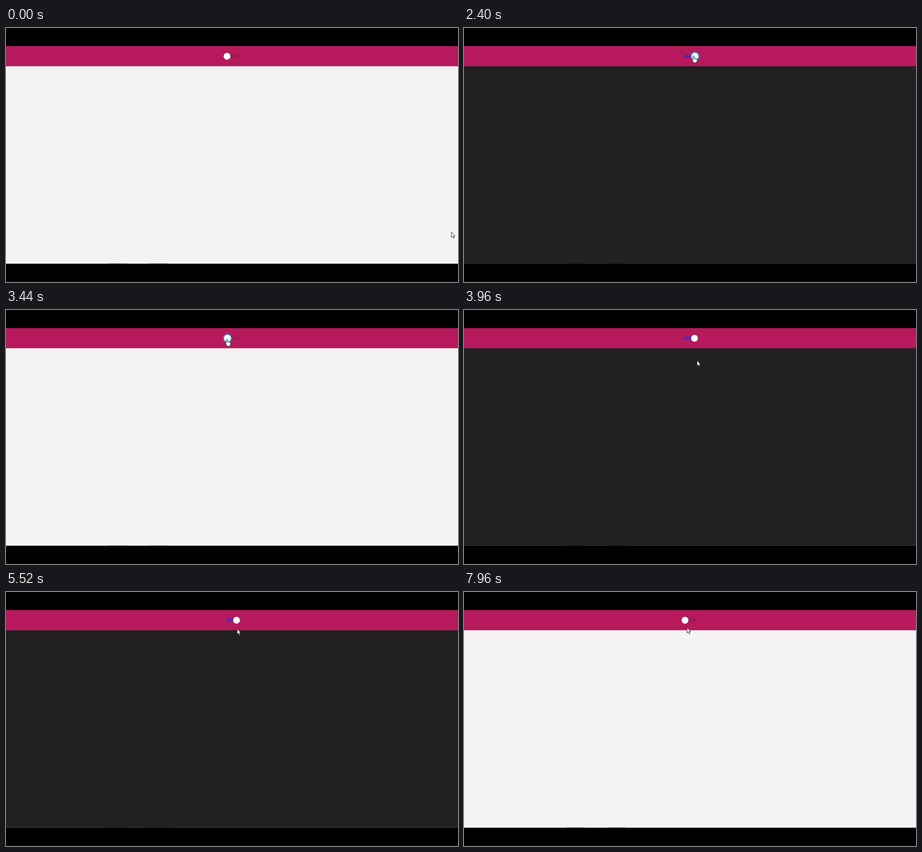
Animation of 998x561 px, one loop 8 s. Source, as an HTML page with a canvas:

```html
<!DOCTYPE html>
<html lang="en">
<head>
<meta charset="utf-8">
<title>Theme toggle</title>
<style>
html, body { margin: 0; width: 100%; height: 100%; overflow: hidden; background: #000; }
canvas { display: block; width: 100%; height: 100%; }
</style>
</head>
<body>
<canvas id="stage" width="998" height="561"></canvas>
<script>
const ctx = document.getElementById('stage').getContext('2d');
const LOOP = 8000, STEP = 40, SLIDE = 400, BLANK = 160;
const TOP = 40, HEADER_END = 84.5, BOTTOM = 520;

// Each click flips the switch; each reload blanks the page for a moment.
const clicks = [1320, 2440, 3520, 5800];
const reloads = [4600, 6480];

const home = { x: 983, y: 450 };
const offKnob = { x: 491, y: 57 };
const onKnob = { x: 507, y: 61 };
const moves = [
  { from: 40, to: 800, spot: offKnob },
  { from: 1360, to: 2080, spot: onKnob },
  { from: 2520, to: 3080, spot: { x: 488, y: 64 } },
  { from: 3520, to: 3800, spot: onKnob },
  { from: 3840, to: 4120, spot: { x: 526, y: 188 } },
  { from: 5160, to: 5640, spot: onKnob },
  { from: 5920, to: 6360, spot: { x: 561, y: 213 } },
  { from: 6920, to: 7520, spot: { x: 498, y: 100 } },
  { from: 7800, to: 7960, spot: { x: 492, y: 78 } }
];

const arrow = new Path2D('M.5 .5V12.6L3.2 10L5.2 14.4L7 13.6L5 9.3H8.6Z');
const hand = new Path2D('M-1.3 1.2Q0 -.8 1.3 1.2V5.5Q2.6 4.4 3.6 6Q5 5 6 6.8' +
  'Q7.8 6 7.9 8V11.5L6.5 14V16H-.3V14L-3.8 9.6Q-4 7.6 -2.5 8.2L-1.3 9.4Z');
const knuckles = new Path2D('M1.3 5.5V8.5M3.6 6V8.7M6 6.8V9');

const clamp = v => Math.max(0, Math.min(1, v));
const mix = (a, b, k) => a + (b - a) * k;
const ease = v => { const k = clamp(v); return k * k * (3 - 2 * k); };
const blend = (a, b, k) => `rgb(${a.map((v, i) => Math.round(mix(v, b[i], k)))})`;

function rect(color, x, y, right, bottom) {
  ctx.fillStyle = color;
  ctx.fillRect(x, y, right - x, bottom - y);
}

function disc(color, x, y, r) {
  ctx.fillStyle = color;
  ctx.beginPath();
  ctx.arc(x, y, r, 0, 2 * Math.PI);
  ctx.fill();
}

function pointerAt(t) {
  const place = moves.reduce((p, { from, to, spot }) => {
    const k = ease((t - from) / (to - from));
    return { x: mix(p.x, spot.x, k), y: mix(p.y, spot.y, k) };
  }, home);
  return { x: Math.round(place.x), y: Math.round(place.y) };
}

function drawSwitch(t, count) {
  const slide = count ? ease((t - clicks[count - 1]) / SLIDE) : 1;
  const on = count % 2 ? slide : 1 - slide;
  const glow = clamp((t - 640) / 120) * clamp((3680 - t) / 120);
  const x = mix(488, 509, on) + glow, y = 62.4;

  ctx.fillStyle = blend([163, 24, 86], [91, 43, 160], on);
  ctx.beginPath();
  ctx.roundRect(485, 58.5, 29, 7.5, 3);
  ctx.fill();

  if (glow) {
    const halo = ctx.createRadialGradient(x, y, 7, x, y, 10.8);
    halo.addColorStop(0, `rgba(45,165,220,${glow})`);
    halo.addColorStop(0.5, `rgba(45,155,215,${0.85 * glow})`);
    halo.addColorStop(1, 'rgba(70,110,190,0)');
    disc(halo, x, y, 10.8);
  }
  ctx.save();
  ctx.shadowColor = 'rgba(0,0,0,0.25)';
  ctx.shadowBlur = 2;
  disc('#fff', x, y, 7.6);
  ctx.restore();
}

function drawPointer({ x, y }, overSwitch) {
  const shape = overSwitch ? hand : arrow;
  ctx.save();
  ctx.translate(x, y);
  ctx.fillStyle = '#fff';
  ctx.strokeStyle = '#222';
  ctx.fill(shape);
  ctx.stroke(shape);
  if (overSwitch) {
    ctx.lineWidth = 0.7;
    ctx.stroke(knuckles);
  }
  ctx.restore();
}

function draw(t) {
  const count = clicks.filter(c => c <= t).length;
  const dark = count % 2 === 1;
  const blank = reloads.some(r => t >= r && t < r + BLANK);
  const pointer = pointerAt(t);

  rect('#000', 0, 0, 998, 561);
  rect(blank ? '#fefefe' : dark ? '#212121' : '#f3f3f3', 0, TOP, 998, BOTTOM);
  if (!blank) {
    rect('#b61a5c', 0, TOP, 998, HEADER_END);
    drawSwitch(t, count);
  }

  // Thin edge of the page, with two darker pieces
  rect(dark && !blank ? '#303641' : '#879b9d', 0, BOTTOM, 998, BOTTOM + 1);
  for (const x of [225, 316]) rect('rgba(0,0,0,0.45)', x, BOTTOM, x + 42, BOTTOM + 1);
  rect('#141414', 0, 560, 998, 561);

  const overSwitch = !blank && Math.abs(pointer.x - 499) < 20 && Math.abs(pointer.y - 63) < 11;
  drawPointer(pointer, overSwitch);
}

function tick() {
  const t = performance.now() % LOOP;
  draw(Math.floor(t / STEP) * STEP);
  requestAnimationFrame(tick);
}
tick();
</script>
</body>
</html>
```
